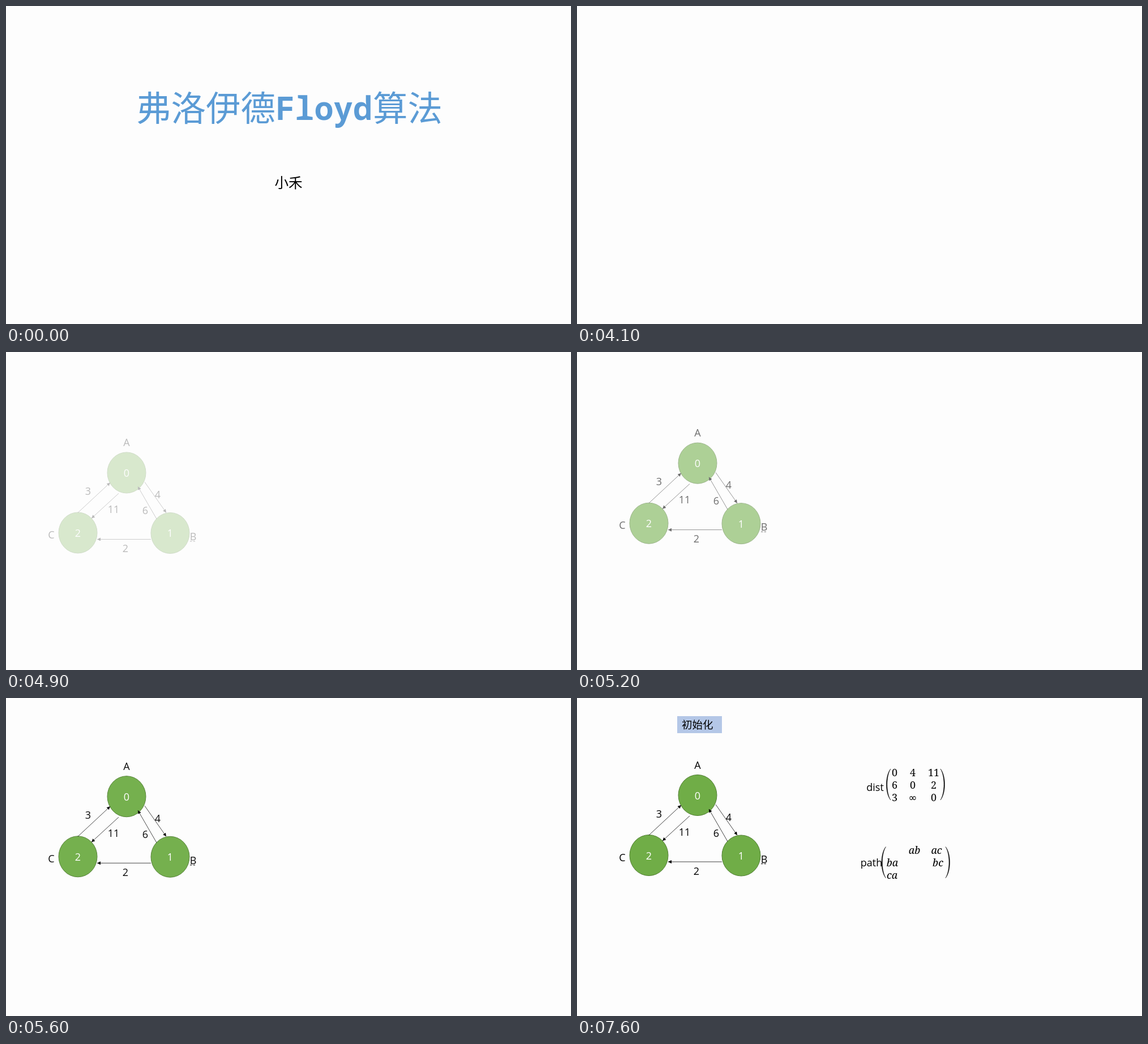
Recreate the animation shown at these times as an HTML page. Size 998 by 561 pixels, loop 8000 ms.

```html
<!DOCTYPE html>
<html lang="zh">
<head>
<meta charset="utf-8">
<style>
  html, body { margin: 0; width: 100%; height: 100%; overflow: hidden; background: #fdfdfd; }
  svg { display: block; width: 998px; height: 561px; font: 18px "Open Sans", "Noto Sans", sans-serif; }
  .han { font-family: "Noto Sans CJK SC", "Noto Sans CJK", sans-serif; font-weight: 300; }
  .mono { font: bold 57px "Noto Sans Mono", monospace; }
  .math { font-family: "Noto Serif", "DejaVu Sans", serif; }
  .mid { text-anchor: middle; }
  .edge { stroke: #000; stroke-width: .75; }
  .node { fill: #70ad47; stroke: #507e32; }
</style>
</head>
<body>
<svg viewBox="0 0 998 561">
  <defs>
    <marker id="arrow" markerUnits="userSpaceOnUse" markerWidth="7" markerHeight="7" refX="6" refY="3" orient="auto">
      <path d="M0 0L6 3L0 6z"/>
    </marker>
  </defs>
  <g id="title">
    <g fill="#5b9bd5">
      <text class="han" x="230" y="203" font-size="61.5">弗洛伊德</text>
      <text class="mono" x="476" y="200.5">Floyd</text>
      <text class="han" x="648" y="203" font-size="61.5">算法</text>
    </g>
    <text class="han mid" x="499" y="320.5" font-size="24.6">小禾</text>
  </g>
  <g id="graph"></g>
  <g id="label">
    <rect x="177" y="32" width="79" height="30" fill="#b4c7e7"/>
    <text class="han" x="185" y="54" font-size="18.5">初始化</text>
  </g>
  <g id="matrices"></g>
</svg>
<script>
const $ = id => document.getElementById(id);
const [title, graph, label, matrices] = ['title', 'graph', 'label', 'matrices'].map($);

// Text centred on (x, y), with y at the middle of the capitals.
const text = (s, x, y, attrs = '') => `<text class="mid" x="${x}" y="${y + 6.5}" ${attrs}>${s}</text>`;
const math = (s, x, y, attrs = '') => `<text class="mid math" x="${x}" y="${y + 6.5}" ${attrs}>${s}</text>`;

const edge = (x1, y1, x2, y2) =>
  `<line class="edge" x1="${x1}" y1="${y1}" x2="${x2}" y2="${y2}" marker-end="url(#arrow)"/>`;

const node = (s, x, y) =>
  `<ellipse class="node" cx="${x}" cy="${y}" rx="34" ry="36"/>` + text(s, x, y + .5, 'fill="#fff"');

// Tall bracket; bulge is negative for an opening one.
const paren = (x, top, bulge) =>
  `<path stroke="#000" stroke-width=".5" d="M${x} ${top}c${bulge} 12 ${bulge} 43 0 55c${bulge * .82} -13 ${bulge * .82} -42 0 -55z"/>`;

graph.innerHTML = [
  node(0, 213, 171.5), node(2, 127, 277.5), node(1, 290, 278),
  edge(127, 242, 184, 189), edge(199, 208, 151, 252), edge(245, 188, 283, 242),
  edge(266, 253, 233, 196), edge(256, 289, 161, 289),
  text('A', 213, 118), text('B', 330.5, 284), text('C', 80, 281),
  text(3, 145, 204), text(11, 190, 236), text(4, 268, 210), text(6, 246, 238), text(2, 211, 305),
  '<path d="M325 292.5h9" stroke="#000" stroke-dasharray="3.5 2"/>'
].join('');

const dist = [[0, 4, 11], [6, 0, 2], [3, '∞', 0]];
const columns = [561, 593, 630];
const italic = 'font-style="italic"';
matrices.innerHTML = [
  text('dist', 526.5, 157), paren(554, 125, -10), paren(642, 125, 10),
  ...dist.flatMap((row, r) => row.map((v, c) => math(v, columns[c], 131 + r * 22))),
  text('path', 520, 290), paren(545.5, 262.5, -10), paren(651, 262.5, 10),
  math('ab', 596, 268, italic), math('ac', 635, 268, italic),
  math('ba', 557, 290, italic), math('bc', 637.5, 290, italic), math('ca', 556.5, 312, italic)
].join('');

const progress = (t, start, length) => Math.min(1, Math.max(0, (t - start) / length));

function draw(now) {
  const t = Math.floor(now % 8000 / 100) * 100; // ten steps per second
  const rise = progress(t, 4640, 1000);
  title.setAttribute('opacity', t < 4100 ? 1 : 0);
  graph.setAttribute('opacity', rise);
  graph.setAttribute('transform', `translate(0 ${56 * (1 - rise)})`);
  label.setAttribute('opacity', progress(t, 5950, 500));
  matrices.setAttribute('opacity', progress(t, 6950, 500));
  requestAnimationFrame(draw);
}
draw(performance.now());
</script>
</body>
</html>
```
